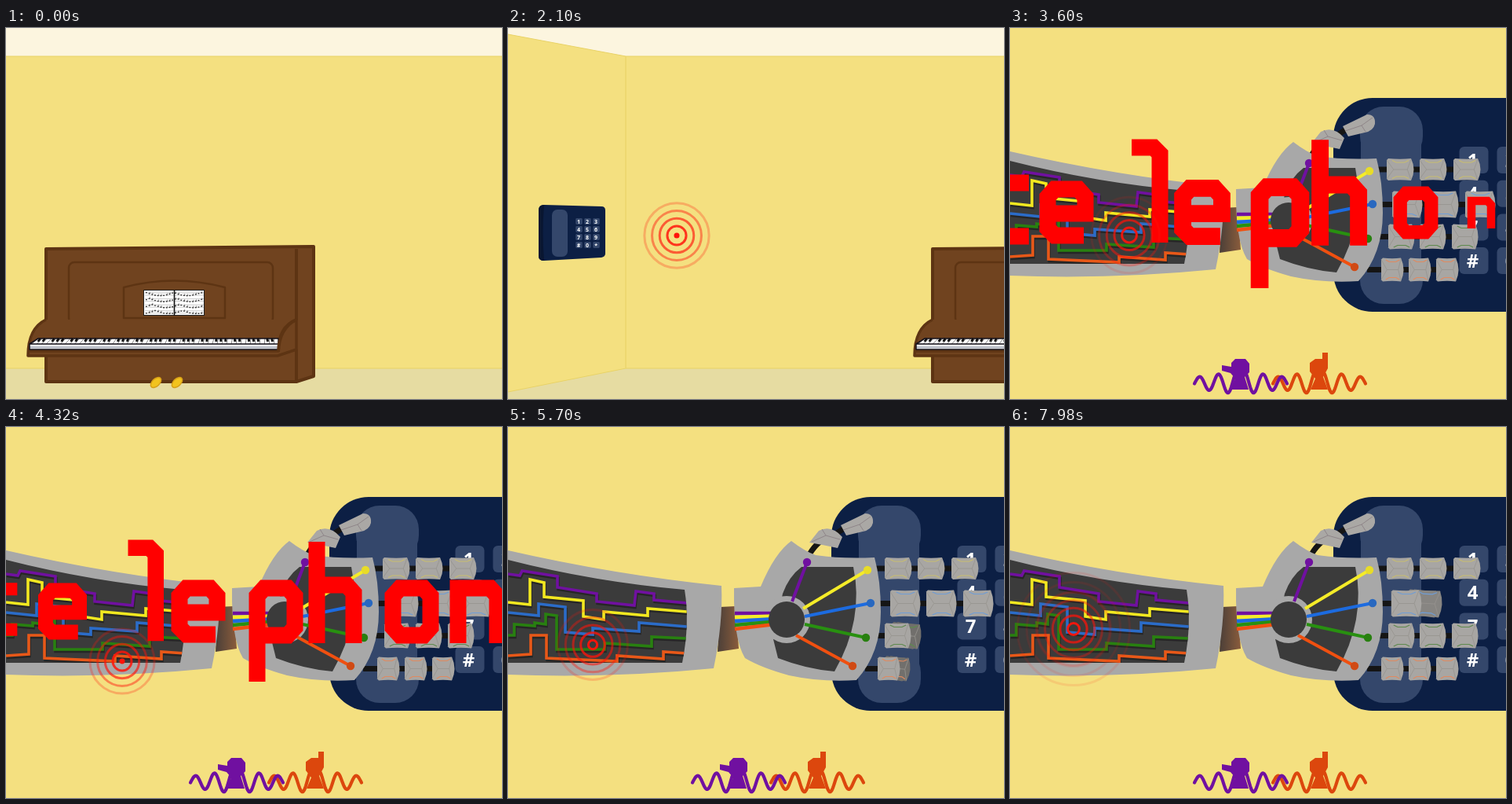
Recreate the animation shown at these times as an HTML page with a canvas. Size 632x472 px, loop 8000 ms.

```html
<!DOCTYPE html>
<html lang="en">
<head>
<meta charset="utf-8">
<title>Piano, phone and robot hand</title>
<style>
html, body { margin: 0; width: 100%; height: 100%; overflow: hidden; background: #f4e080; }
canvas { display: block; }
</style>
</head>
<body>
<canvas id="stage" width="632" height="472"></canvas>
<script>
const c = document.getElementById('stage').getContext('2d');
const LOOP = 8000, TAU = Math.PI * 2;
const PURPLE = '#7010a0', YELLOW = '#f5ec28', BLUE = '#1c6be0', GREEN = '#289010', ORANGE = '#f05010';
const TONES = [PURPLE, YELLOW, BLUE, GREEN, ORANGE];
const GREY = '#a8a8a8', DARK = '#3b3b3b', BROWN = '#70431f', EDGE = '#5d3413', NAVY = '#0c1f44', KEY = '#34476b';

const mix = (a, b, p) => a + (b - a) * p;
const part = (t, a, b) => Math.min(1, Math.max(0, (t - a) / (b - a)));
const ease = (t, a, b) => (1 - Math.cos(Math.PI * part(t, a, b))) / 2;

function group(draw) { c.save(); draw(); c.restore(); }
function fill(d, color) { c.fillStyle = color; c.fill(new Path2D(d)); }
function line(d, color, w) { c.strokeStyle = color; c.lineWidth = w; c.stroke(new Path2D(d)); }
function dot(x, y, r, color) { c.fillStyle = color; c.beginPath(); c.arc(x, y, r, 0, TAU); c.fill(); }
function box(x, y, w, h, r, color) { c.fillStyle = color; c.beginPath(); c.roundRect(x, y, w, h, r); c.fill(); }
function ring(x, y, r, alpha) {
  c.strokeStyle = `rgba(255,20,10,${alpha})`;
  c.beginPath(); c.arc(x, y, r, 0, TAU); c.stroke();
}

// ---- room ----
function wall() {
  box(-900, -300, 2200, 1100, 0, '#f4e080');
  fill('M150 36H1300V-300H-900V-160Z', '#fcf5df');
  fill('M150 433H1300V800H-900V643Z', '#e6dca2');
  line('M-900 -160L150 36H1300M150 36V433M-900 643L150 433H1300', '#e9d367', 1.2);
}

function sheetMusic() {
  box(175, 333, 78, 33, 0, '#222');
  box(176, 334, 76, 31, 0, '#fff');
  for (let row = 0; row < 4; row++) {
    const y = 337 + row * 7.6;
    line(`M177 ${y}H252M177 ${y + 3}H252`, '#aaa', .6);
    for (let i = 0; i < 20; i++) {
      const h = Math.abs(Math.sin(i * 12.9 + row * 78.2)) * 4;
      box(178 + i * 3.7, y - 1 + h, 1.7, 1.3, 0, '#222');
      if (i % 3) line(`M${179.5 + i * 3.7} ${y + h}v-2.5`, '#444', .6);
    }
  }
  line('M214.5 333V366', '#111', 1.6);
}

function piano() {
  const body = 'M51 281L392 278V443L370 450H51Z';
  c.lineJoin = 'round';
  fill(body, BROWN);
  line(body + 'M370 281V372M370 409V450', EDGE, 4);
  c.strokeStyle = EDGE; c.lineWidth = 2.5;
  c.beginPath(); c.roundRect(80, 298, 260, 78, 7); c.stroke();
  line('M150 369V330Q214 313 279 330V369Z', EDGE, 2.5);
  sheetMusic();
  const shelf = 'M51 371Q28 382 28 417H346L370 409V371Q347 380 347 411H28';
  fill('M51 371Q28 382 28 417H346L370 409V371Z', BROWN);
  line(shelf, EDGE, 3.5);
  fill('M41 395H347V402H30Z', '#fff');
  for (let i = 0; i < 52; i++) {
    const x = 33 + i * 6.05, lean = (51 - i) * .15;
    line(`M${x + lean} 395L${x} 402`, '#555', .7);
    if (![2, 6].includes(i % 7)) line(`M${x + 3 + lean} 395L${x + 4 + lean / 2} 399`, '#111', 3);
  }
  box(30, 402, 317, 7, 0, '#eee');
  box(30, 405, 317, 2.5, 0, '#b8bcc6');
  line('M41 395H347V409H30V402ZM30 402H347', '#151018', 1.5);
  line('M347 412Q348 382 370 371', EDGE, 4);
  for (const x of [191, 218]) {
    c.beginPath(); c.ellipse(x, 451, 8, 4.7, -.75, 0, TAU);
    c.fillStyle = '#f2c31e'; c.fill();
    c.strokeStyle = '#d79f17'; c.lineWidth = 1.5; c.stroke();
  }
}

function keypad(x, y, dx, dy, w, h, size) {
  c.font = `bold ${size}px "Noto Sans", "Open Sans", sans-serif`;
  c.textAlign = 'center'; c.textBaseline = 'alphabetic';
  [...'123456789#0*'].forEach((ch, i) => {
    const kx = x + i % 3 * dx, ky = y + Math.floor(i / 3) * dy;
    box(kx - w / 2, ky - h / 2, w, h, w / 6, KEY);
    c.fillStyle = '#fff';
    c.fillText(ch, kx - size * .06, ky + size * .36);
  });
}

function wallPhone() {
  fill('M39 232Q39 225 46 225L119 227Q124 227 124 232V287Q124 291 119 292L46 296Q39 296 39 290Z', NAVY);
  fill('M39 232Q39 225 46 225Q43 260 46 296Q39 296 39 290Z', '#091631');
  box(56, 231, 20, 60, 7, KEY);
  keypad(90.5, 246, 11, 10, 8.5, 8, 7);
}

function bigPhone() {
  box(412, 89, 430, 272, 50, NAVY);
  box(446, 100, 80, 68, 30, KEY);
  box(446, 282, 80, 69, 30, KEY);
  box(447, 128, 77, 195, 0, KEY);
  keypad(591, 168, 48, 42.7, 37, 34, 24);
}

// ---- robot arm ----
const traces = [
  'M0 187L15 189 18 183 63 190V204L113 212V222L161 227 163 209 186 212V220L228 224',
  'M0 223L28 226V194L46 198V216L96 221V241L122 245V235L178 240V231L228 235',
  'M0 236L39 240V225L73 229V261L108 264V256L167 260V249L228 254',
  'M0 265H8V251L34 253V249L48 251V238L62 240V283H123V275L183 279V267L228 269',
  'M0 291L29 289V265H49V294L139 298V291L198 295V286L228 288'
];
const nerves = [[362, 222, 381, 172], [376, 231, 458, 182], [378, 241, 462, 224], [378, 251, 456, 268], [367, 265, 439, 304]];
// y, segment height, segment width, start of each segment, tint
const fingers = [
  [180, 28, 35, [480, 522, 565], '#c8bd70'],
  [224.5, 34, 39, [487, 533, 580], '#6f9dd6'],
  [265.5, 32, 34, [482, 522, 563], '#5f8a4f'],
  [307.5, 30, 29, [473, 508, 543], '#e08a60']
];

function segment(w, h, tint, shade) {
  const t = h / 2, r = w / 2;
  const shape = `M${-r} ${2 - t}L${2 - r} ${-t}Q0 ${1.5 - t} ${r - 4} ${-t}Q${r + 3} 0 ${r - 4} ${t}Q0 ${t - 1.5} ${2 - r} ${t}L${-r} ${t - 2}Z`;
  fill(shape, `rgb(${[168, 166, 163].map(v => v - shade * 55)})`);
  line(`M${-r} ${2 - t}L${-r / 2} 0L${-r} ${t - 2}M${r - 4} ${1 - t}L${r / 2} 0L${r - 4} ${t - 1}M${-r / 2} 0H${r / 2}`, '#96938f', .8);
  line(`M${-r * .6} ${2.5 - t}L${-r * .3} ${5 - t}H${r * .3}L${r * .6} ${2.5 - t}M${-r * .6} ${t - 2.5}L${-r * .3} ${t - 5}H${r * .3}L${r * .6} ${t - 2.5}`, tint, 1.2);
}

function finger([y, h, w, xs, tint], curl) {
  const open = 1 - curl;
  const place = [xs[0] - 2 * curl, mix(xs[0] + 11, xs[1], open), mix(xs[0] + 6, xs[2], open * open)];
  line(`M455 ${y}H${place[2] + 8}`, '#151515', 7);
  for (const i of [2, 1, 0]) group(() => {
    c.translate(place[i] + w / 2, y);
    c.rotate(i ? curl * .1 : 0);
    segment(w, h, tint, i ? curl : 0);
  });
}

function arm(t) {
  c.lineJoin = 'miter';
  const curls = [
    0,
    ease(t, 6200, 6550) - .4 * ease(t, 7800, 7980),
    ease(t, 5300, 5560) - ease(t, 5980, 6300),
    ease(t, 5120, 5420) - ease(t, 5900, 6200)
  ];
  const wrist = c.createLinearGradient(268, 0, 294, 0);
  wrist.addColorStop(0, '#4d4038');
  wrist.addColorStop(1, '#8a5c3c');
  fill('M270 229L290 228 294 282 267 286Z', wrist);

  fill('M0 157Q136 188 272 202Q274 250 262 307Q130 320 0 315Z', GREY);
  const panel = 'M0 169Q110 197 225 207Q232 250 222 300H0Z';
  fill(panel, DARK);
  group(() => {
    c.clip(new Path2D(panel));
    traces.forEach((d, i) => {
      group(() => { c.translate(1, 2.5); line(d, '#262626', 3.5); });
      line(d, ['#7010a0', '#f2e820', '#2b6cc8', '#288010', '#e85818'][i], 3.6);
    });
  });

  line('M384 162Q396 142 414 138L430 128', '#151515', 7);
  fill('M384 147L396 132Q412 124 426 140L420 154Q402 150 384 147Z', '#aaa8a5');
  fill('M424 125L455 110Q466 110 465 122Q463 131 452 133L431 138Z', '#aaa8a5');
  line('M387 146L405 138 423 143M405 138L400 130M427 131L448 124 462 114M448 124L453 132', '#8f8689', 1);
  fingers.forEach((f, i) => finger(f, curls[i]));

  fill('M288 205L322 203Q340 160 361 145Q378 158 392 163Q425 168 467 166Q475 195 475 235Q475 288 444 322Q400 325 358 316Q322 306 302 294Q287 270 288 205Z', GREY);
  fill('M374 178L440 178Q454 245 416 311Q380 308 344 294L338 270 350 212Q358 190 374 178Z', DARK);
  dot(355, 245, 30, GREY);
  TONES.forEach((color, i) => {
    const [x, y, u, v] = nerves[i];
    line(`M289 ${237 + i * 5}L340 ${237 + i * 3.5}`, color, 4.5);
    line(`M${x} ${y}L${u} ${v}`, color, 4);
    dot(u, v, 5.2, ['#7010a0', '#e8dc28', '#2868c0', '#288010', '#d04a14'][i]);
  });
  dot(355, 245, 23, DARK);
}

// ---- signal signs ----
function wave(cx, color, hand) {
  let d = '';
  for (let x = -59; x <= 59; x++) {
    const far = Math.abs(x), size = 15 - 8 * far / 59;
    d += `${d ? 'L' : 'M'}${cx + x} ${451.5 - size * Math.cos(TAU * (far - 28.5) / 24)}`;
  }
  c.lineCap = c.lineJoin = 'round';
  line(d, color, 4.2);
  c.lineCap = 'butt';
  fill(hand, color);
}
function signs() {
  wave(394, '#dc470d', 'M398 413H405V433L399 444 405 460H383L389 446 382 437V426L389 421H398Z');
  wave(294, PURPLE, 'M270 429L282 431V426L287 421H300L305 427V438L299 444 304 460H282L287 446 281 439 270 436Z');
}

// ---- block lettering: "telephone" ----
const E = 'M22 29H-15L-24 20V-20L-15 -30H15L24 -20V1H-24';
const letters = [
  [-16, 'M-15 -75V20L-6 30H40M-35 -38H40'], [72, E], [178, 'M-23 -83H5L13 -75V38'], [245, E],
  [344, 'M-24 89V-20L-15 -30H15L24 -20V20L15 30H-24'], [417, 'M-21 -89V40M-21 -34H17L26 -24V40'],
  [517, 'M-15 -30H15L24 -20V20L15 30H-15L-24 20V-20Z'], [600, 'M-24 40V-30H17L26 -20V40']
];
function word(t) {
  c.lineJoin = 'miter';
  letters.forEach(([x, d], i) => {
    const start = 2865 + 70 * i, end = 4150 + 60 * i;
    const size = part(t, start, start + 348) ** 2
      + .08 * Math.sin(Math.PI * part(t, start + 348, start + 560))
      - part(t, end, end + 348) ** 2;
    if (size > .005) group(() => {
      c.translate(x, 235);
      c.scale(size, size);
      line(d, '#f00', 21);
    });
  });
}

// ---- pointer ripple ----
const route = [[240, 65, 60], [960, 72, 162], [1600, 172, 228], [2100, 215, 264], [2400, 84, 261], [2760, 90, 261],
  [3120, 152, 257], [3700, 152, 264], [4150, 150, 306], [4320, 148, 298], [5000, 120, 288], [5320, 106, 281],
  [5700, 108, 277], [6150, 116, 279], [6960, 133, 263], [7740, 81, 257], [8000, 81, 257]];
const clicks = [2400, 5010, 5330, 6150, 7800];

function ripple(t) {
  if (t < 270) return;
  const k = route.findIndex(p => p[0] > t);
  const [a, x0, y0] = route[k - 1], [b, x1, y1] = route[k];
  const p = ease(t, a, b), x = mix(x0, x1, p), y = mix(y0, y1, p);
  const first = (((t - 960) / 317.5 * 9.7 + 6.3) % 9.7 + 9.7) % 9.7;
  c.lineWidth = 3;
  for (let r = first; r < 50; r += 9.7) {
    if (r < 2.8) dot(x, y, r + 1.2, '#ff140a');
    else ring(x, y, r, Math.min(1, 1.08 - r / 50));
  }
  for (const at of clicks) {
    const q = part(t, at, at + 230);
    if (q > 0 && q < 1) for (const gap of [0, 12, 24]) {
      const r = 91 * q - gap;
      if (r > 2) ring(x, y, r, .5 * (1 - q));
    }
  }
}

function draw(t) {
  c.clearRect(0, 0, 632, 472);
  const pan = 490 * ease(t, 300, 1900), zoom = ease(t, 2160, 2700);
  const full = 3.83, scale = full ** zoom, px = mix(39, 412, zoom), py = mix(260.5, 225, zoom);
  group(() => {
    c.translate(px, py); c.scale(scale, scale); c.translate(-39, -260.5);
    c.translate(pan - 490, 0);
    wall();
    if (zoom < 1) {
      wallPhone();
      c.translate(490, 0);
      piano();
    }
  });
  if (zoom > 0) group(() => {
    c.globalAlpha = part(zoom, .1, .6);
    if (zoom === 1) box(0, 0, 632, 472, 0, '#f4e080');
    c.translate(px, py); c.scale(scale / full, scale / full); c.translate(-412, -225);
    bigPhone();
  });
  if (t > 2560) {
    group(() => { c.globalAlpha = part(t, 2560, 2700); signs(); });
    group(() => { c.translate(-620 * (1 - ease(t, 2640, 3410)), 0); arm(t); });
    word(t);
  }
  ripple(t);
}

function frame() {
  draw(performance.now() % LOOP);
  requestAnimationFrame(frame);
}
frame();
</script>
</body>
</html>
```
